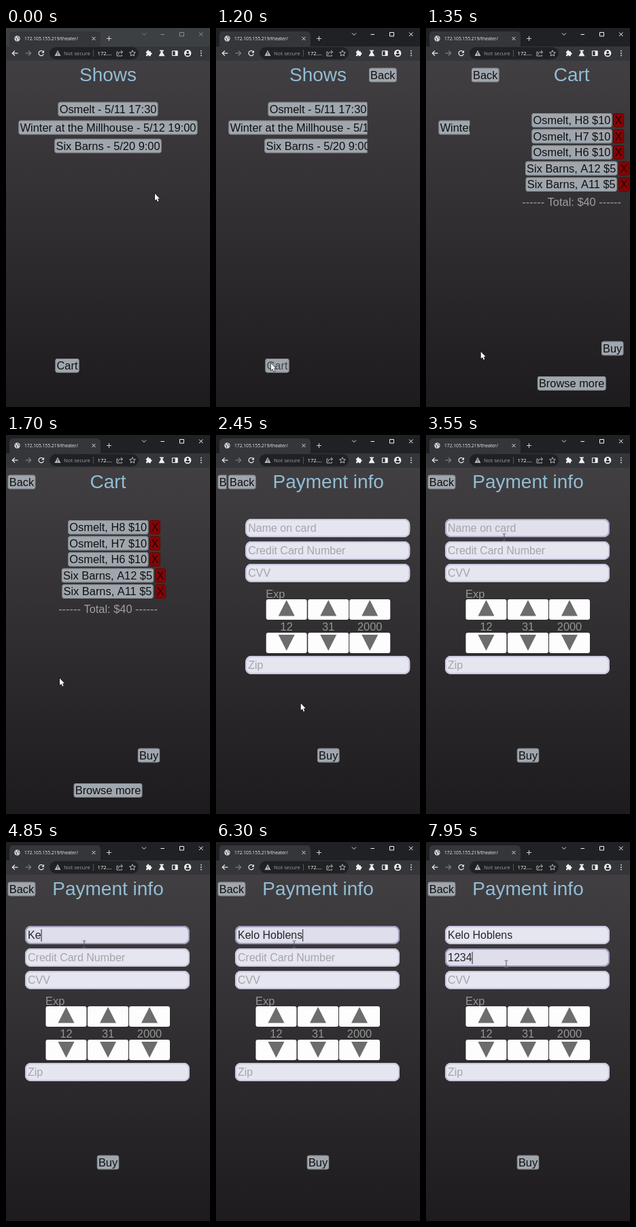
These frames come from a looping animation (300x556 px, 8000 ms). An HTML page with a canvas:

```html
<!DOCTYPE html>
<html lang="en">
<head>
<meta charset="utf-8">
<title>Theater</title>
<style>
  html, body { margin: 0; width: 100%; height: 100%; overflow: hidden; background: #1d1b1d; }
  canvas { display: block; width: 300px; height: 556px; }
</style>
</head>
<body>
<canvas id="stage"></canvas>
<script>
const W = 300, H = 556, LOOP = 8000, TICK = 50, TOP = 48;
const SANS = '"Liberation Sans", Arial, sans-serif';
const UI = '"Open Sans", "Noto Sans", sans-serif';
const canvas = document.getElementById('stage');
const ctx = canvas.getContext('2d');
const dpr = window.devicePixelRatio || 1;
canvas.width = W * dpr;
canvas.height = H * dpr;

const SHOWS = ['Osmelt - 5/11 17:30', 'Winter at the Millhouse - 5/12 19:00', 'Six Barns - 5/20 9:00'];
const ITEMS = ['Osmelt, H8 $10', 'Osmelt, H7 $10', 'Osmelt, H6 $10', 'Six Barns, A12 $5', 'Six Barns, A11 $5'];
const NAME = { text: 'Kelo Hoblens', keys: [4450, 4850, 5150, 5300, 5400, 5600, 5750, 5850, 5950, 6100, 6200, 6300] };
const CARD = { text: '1234', keys: [7500, 7650, 7800, 7900] };

// Pointer path: time, x, y
const PATH = [
  [50, 219, 243], [300, 84, 487], [450, 84, 487], [600, 81, 492], [1250, 81, 492],
  [1700, 79, 357], [1950, 208, 468], [2100, 208, 468], [2650, 89, 362], [2950, 92, 355],
  [3350, 115, 150], [6600, 115, 150], [6800, 117, 72], [7000, 117, 166],
  [7100, 117, 166], [7300, 118, 178], [7750, 118, 178], [7850, 118, 179]
];

const clamp = v => Math.max(0, Math.min(1, v));
const ramp = (t, from, to) => clamp((t - from) / (to - from));
const smooth = p => p * p * (3 - 2 * p);
const mix = (a, b, p) => `rgb(${a.map((v, i) => Math.round(v + (b[i] - v) * p))})`;

// The CSS "ease" curve
function ease(x) {
  let lo = 0, hi = 1, u = x;
  for (let i = 0; i < 20; i++) {
    u = (lo + hi) / 2;
    const bx = 3 * u * (1 - u) ** 2 * 0.25 + 3 * u * u * (1 - u) * 0.25 + u ** 3;
    if (bx < x) lo = u; else hi = u;
  }
  return 3 * u * (1 - u) ** 2 * 0.1 + 3 * u * u * (1 - u) + u ** 3;
}

function pointer(t) {
  let a = PATH[0];
  for (const b of PATH) {
    if (t < b[0]) {
      const p = smooth(ramp(t, a[0], b[0]));
      return [a[1] + (b[1] - a[1]) * p, a[2] + (b[2] - a[2]) * p];
    }
    a = b;
  }
  return [a[1], a[2]];
}

function text(str, x, y, size, color, align = 'left', family = SANS) {
  ctx.font = `${size}px ${family}`;
  ctx.fillStyle = color;
  ctx.textAlign = align;
  ctx.fillText(str, x, y);
}

function box(x, y, w, h, r, fill, stroke, line = 1) {
  ctx.beginPath();
  ctx.roundRect(x, y, w, h, r);
  ctx.fillStyle = fill;
  ctx.fill();
  if (!stroke) return;
  ctx.beginPath();
  ctx.roundRect(x + line / 2, y + line / 2, w - line, h - line, Math.max(0, r - line / 2));
  ctx.strokeStyle = stroke;
  ctx.lineWidth = line;
  ctx.stroke();
}

function path(points, color, width = 1, close = false) {
  ctx.beginPath();
  points.forEach(([x, y]) => ctx.lineTo(x, y));
  if (close) ctx.closePath();
  ctx.strokeStyle = color;
  ctx.lineWidth = width;
  ctx.stroke();
}

function poly(points, color) {
  ctx.beginPath();
  points.forEach(([x, y]) => ctx.lineTo(x, y));
  ctx.closePath();
  ctx.fillStyle = color;
  ctx.fill();
}

function arc(x, y, r, color, width = 1, from = 0, to = 7) {
  ctx.beginPath();
  ctx.arc(x, y, r, from, to);
  ctx.strokeStyle = color;
  ctx.lineWidth = width;
  ctx.stroke();
}

function dot(x, y, r, color) {
  ctx.beginPath();
  ctx.arc(x, y, r, 0, 7);
  ctx.fillStyle = color;
  ctx.fill();
}

// Browser window; the strip is paler while the window lacks focus
function tabStrip(active) {
  const ctl = active ? '#f4f5f6' : '#8b8e92';
  box(0, 0, W, 28, 0, active ? '#202124' : '#3c4043');
  box(5, 5, 134, 24, 5, '#35363a');
  dot(16.5, 15.5, 4.2, '#d0d3d6');
  path([[13.5, 14], [15.5, 15.5], [15.5, 18.5]], '#35363a', 0.9);
  path([[17.5, 12], [17.5, 14], [20, 16]], '#35363a', 0.9);
  text('172.105.155.219/theater/', 27, 18, 6.7, '#e8eaed', 'left', UI);
  path([[126.5, 13], [131.5, 18]], '#d8dadd');
  path([[131.5, 13], [126.5, 18]], '#d8dadd');
  path([[148, 15.5], [155, 15.5]], '#d0d3d6');
  path([[151.5, 12], [151.5, 19]], '#d0d3d6');
  path([[200, 7.5], [203, 10.5], [206, 7.5]], ctl, 0.9);
  path([[227.5, 9.5], [233, 9.5]], ctl);
  path([[255.5, 6.5], [261.5, 6.5], [261.5, 12], [255.5, 12]], ctl, 1, true);
  path([[284, 6.5], [289.5, 12]], ctl);
  path([[289.5, 6.5], [284, 12]], ctl);
}

function toolbar() {
  const ink = '#f0f1f3';
  box(0, 27, W, TOP - 27, 0, '#35363a');
  path([[17.5, 37], [9.5, 37]], ink, 1.2);
  path([[13, 33.3], [9.3, 37], [13, 40.7]], ink, 1.2);
  path([[28.5, 37], [36.5, 37]], '#85878a', 1.1);
  path([[33, 33.3], [36.7, 37], [33, 40.7]], '#85878a', 1.1);
  arc(51.8, 37, 3.7, ink, 1.2, 0.3, 5.5);
  poly([[56, 32.8], [56, 36.6], [52.3, 36.6]], ink);

  box(64, 28, 131, 18, 9, '#202124');
  poly([[76, 32.5], [80.5, 41], [71.5, 41]], '#b4b7bb');
  path([[76, 35.3], [76, 38.2]], '#202124');
  path([[76, 39], [76, 40]], '#202124');
  ctx.save();
  ctx.beginPath();
  ctx.rect(84, 28, 40, 18);
  ctx.clip();
  text('Not secure', 85, 40, 7.7, '#9aa0a6', 'left', UI);
  ctx.restore();
  path([[128.5, 32], [128.5, 42]], '#5f6368', 0.8);
  text('172....', 134.5, 40, 7.7, '#ffffff', 'left', UI);
  path([[165, 35], [163, 35], [163, 41], [170.5, 41], [170.5, 39.5]], '#c4c7ca', 0.9);
  path([[165, 39], [165.5, 36.5], [168, 35.3], [171, 35.3]], '#c4c7ca', 0.9);
  path([[169, 32.8], [171.7, 35.3], [169, 37.8]], '#c4c7ca', 0.9);
  const star = [];
  for (let i = 0; i < 10; i++) {
    const a = i * Math.PI / 5 - Math.PI / 2, r = i % 2 ? 2.1 : 4.6;
    star.push([186 + r * Math.cos(a), 37.3 + r * Math.sin(a)]);
  }
  path(star, '#c4c7ca', 0.9, true);

  box(206, 34.3, 7, 7, 1, ink);
  dot(209, 34, 1.4, ink);
  dot(213.2, 37.6, 1.4, ink);
  dot(206.2, 37.8, 1.1, '#35363a');
  dot(209.2, 41.2, 1.1, '#35363a');
  box(226, 32.5, 6, 1.4, 0, ink);
  poly([[227.5, 33], [230.5, 33], [230.5, 36], [233.5, 41.3], [224.5, 41.3], [227.5, 36]], ink);
  box(244, 33.2, 8.5, 7.8, 1, '#35363a', ink, 1.1);
  box(248.7, 33.2, 3.8, 7.8, 1, ink);
  dot(267.2, 37, 5.2, ink);
  dot(267.2, 35.3, 1.7, '#202124');
  box(264.3, 37.8, 5.8, 2.6, 1.3, '#202124');
  for (const y of [33.6, 37, 40.4]) dot(287, y, 0.9, ink);
}

// Page parts
function button(label, cx, cy, hover = 0) {
  ctx.font = `16.4px ${SANS}`;
  const w = ctx.measureText(label).width + 4;
  box(cx - w / 2, cy - 10.3, w, 20.6, 3, '#a0a6ad', '#878d94');
  text(label, cx, cy + 5.7, 16.4, mix([14, 16, 18], [66, 72, 77], hover), 'center');
}

function title(str) {
  text(str, 150, 77.6, 28, '#92bdd6', 'center');
}

function field(y, hint, value = '', hover = 0, caret = false) {
  box(28, y, 242, 27, 8.5, mix([230, 230, 240], [222, 222, 236], hover),
    mix([200, 198, 222], [158, 156, 186], hover), 2);
  text(value || hint, 32, y + 19, 16, value ? '#25252b' : '#a4a4aa');
  if (!caret) return;
  ctx.font = `16px ${SANS}`;
  box(32 + ctx.measureText(value).width, y + 5, 1, 18, 0, '#222');
}

function spinner(cx, value) {
  for (const y of [241, 290]) box(cx - 30, y, 60, 30, 3, '#fdfdfd');
  poly([[cx, 242], [cx + 12, 265.5], [cx - 12, 265.5]], '#6c6c6c');
  poly([[cx, 316.5], [cx + 12, 293], [cx - 12, 293]], '#6c6c6c');
  text(value, cx, 286.7, 16.4, '#979697', 'center');
}

function showsPage(t) {
  title('Shows');
  SHOWS.forEach((s, i) => button(s, 150, 119 + 27 * i));
  button('Cart', 90, 495.3, ramp(t, 300, 600));
}

function cartPage(t) {
  button('Back', 23, 69);
  title('Cart');
  ITEMS.forEach((s, i) => {
    const y = 135.3 + 23.55 * i, wide = i > 2;
    button(s, wide ? 149.5 : 150.3, y);
    const x = wide ? 227 : 219;
    box(x - 8, y - 10.3, 16, 20.6, 3, '#840505', '#6b0000');
    text('X', x, y + 5.7, 16.4, '#1a0606', 'center');
  });
  text('------ Total: $40 ------', 150, 260.7, 16.4, '#a09fa0', 'center');
  button('Buy', 210, 470, ramp(t, 1900, 2100));
  button('Browse more', 150, 521.3);
}

const typed = (entry, t) => entry.text.slice(0, entry.keys.filter(k => k <= t).length);

// The caret shows for half a second after a click or a key
function caretOn(t, click, keys) {
  const last = [click, ...keys].filter(k => k <= t).pop();
  return last !== undefined && t - last < 500;
}

function payPage(t) {
  button('Back', 23, 69);
  title('Payment info');
  const over = ramp(t, 3350, 3650) - ramp(t, 6650, 6950);
  field(123, 'Name on card', typed(NAME, t), over, caretOn(t, 3650, NAME.keys));
  field(156, 'Credit Card Number', typed(CARD, t), ramp(t, 7100, 7400), caretOn(t, 7350, CARD.keys));
  field(189, 'CVV');
  text('Exp', 58, 238.7, 16.4, '#979697');
  spinner(88.5, '12');
  spinner(150, '31');
  spinner(211, '2000');
  field(324, 'Zip');
  button('Buy', 150, 470);
}

function page(draw, t, left) {
  if (left >= W) return;
  ctx.save();
  ctx.beginPath();
  ctx.rect(left, TOP, W - left, H - TOP);
  ctx.clip();
  const shade = ctx.createLinearGradient(0, TOP, 0, H);
  shade.addColorStop(0, '#413f41');
  shade.addColorStop(1, '#1d1b1d');
  ctx.fillStyle = shade;
  ctx.fillRect(left, TOP, W - left, H - TOP);
  ctx.translate(left, 0);
  draw(t);
  ctx.restore();
}

const slide = (t, start) => W * (1 - ease(ramp(t, start, start + 500)));

function cursor(t) {
  const [x, y] = pointer(t);
  const inField = t > 2600 && [123, 156].some(top => y >= top && y <= top + 28);
  if (inField) {
    path([[x, y - 5], [x, y + 5]], '#55555a', 1);
    for (const end of [y - 5, y + 5]) path([[x - 2.5, end], [x + 2.5, end]], '#6c6c72', 0.9);
    return;
  }
  const shape = [[0, 0], [0, 10], [2.3, 8], [4, 11.8], [5.6, 11.1], [4, 7.4], [7, 7.2]]
    .map(([dx, dy]) => [x + dx, y + dy]);
  path(shape, '#111', 1.2, true);
  poly(shape, '#fff');
}

function draw(t) {
  ctx.setTransform(dpr, 0, 0, dpr, 0, 0);
  tabStrip(t >= 1000);
  toolbar();
  page(showsPage, t, 0);
  page(cartPage, t, slide(t, 1108));
  page(payPage, t, slide(t, 2090));
  cursor(t);
}

const begin = performance.now();
function loop() {
  const t = (performance.now() - begin) % LOOP;
  draw(Math.floor(t / TICK) * TICK);
  requestAnimationFrame(loop);
}
loop();
</script>
</body>
</html>
```
